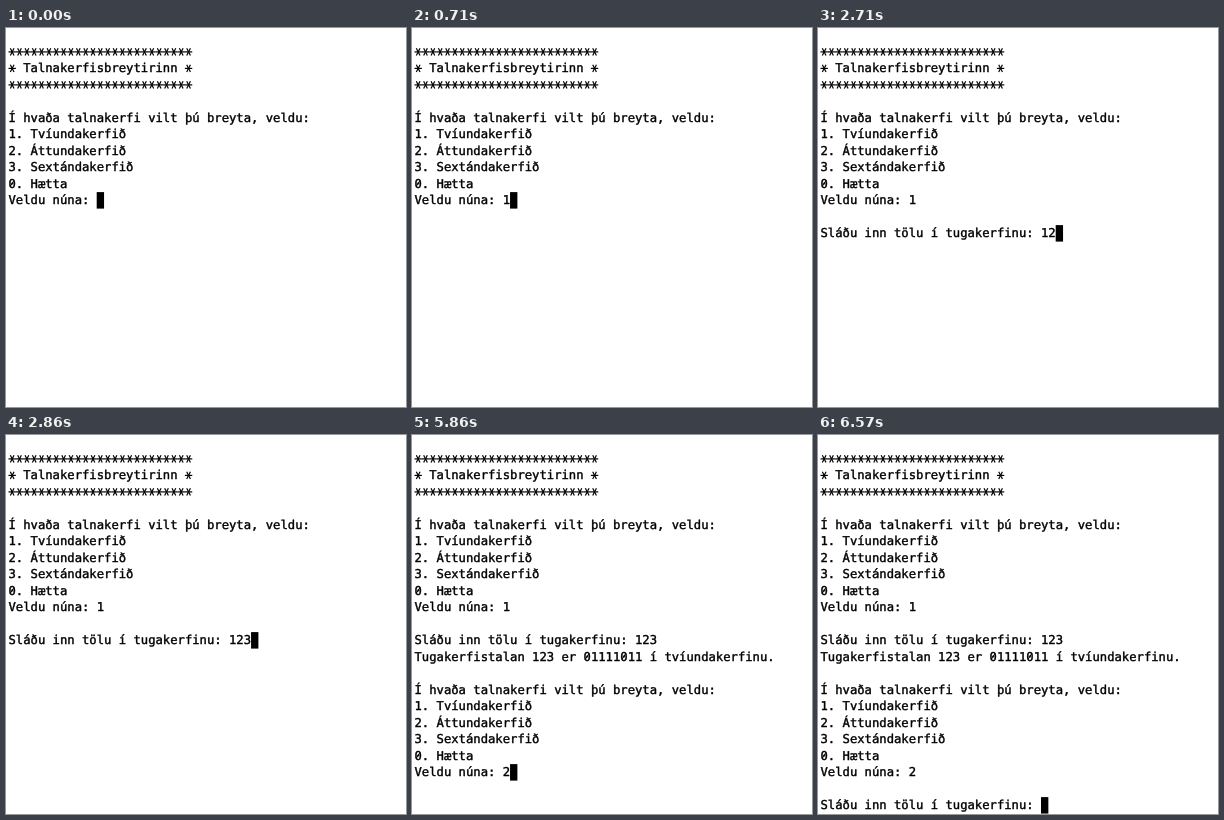
An HTML page with a canvas that plays this animation: 400 px wide and 379 px high, repeating every 8000 ms.

```html
<!DOCTYPE html>
<html lang="is">
<head>
<meta charset="utf-8">
<style>
html, body { margin: 0; width: 100%; height: 100%; overflow: hidden; background: #fff; }
canvas { display: block; }
</style>
</head>
<body>
<canvas width="400" height="379"></canvas>
<script>
const ctx = document.querySelector('canvas').getContext('2d');
const LOOP = 8000, CELL = 7.35, ROW = 16.5, LEFT = 2.5, TOP = 15.6, BASE = 12.1;

const stars = '*'.repeat(25);
const menu = `Í hvaða talnakerfi vilt þú breyta, veldu:
1. Tvíundakerfið
2. Áttundakerfið
3. Sextándakerfið
0. Hætta
Veldu núna: `;
const ask = '\n\nSláðu inn tölu í tugakerfinu: ';

// Terminal output: [time in ms, text appended]
const output = [
  [0, `${stars}\n* Talnakerfisbreytirinn *\n${stars}\n\n${menu}`],
  [710, '1'],
  [1570, ask],
  [2710, '12'],
  [2860, '3'],
  [3860, `\nTugakerfistalan 123 er 01111011 í tvíundakerfinu.\n\n${menu}`],
  [5860, '2'],
  [6570, ask]
];

function line(x, y, dx, dy, width) {
  ctx.lineWidth = width;
  ctx.beginPath();
  ctx.moveTo(x - dx, y - dy);
  ctx.lineTo(x + dx, y + dy);
  ctx.stroke();
}

// Wide six-armed asterisk, centred on the capitals
function asterisk(x, y) {
  for (const a of [0, Math.PI / 3, -Math.PI / 3])
    line(x, y, 3.7 * Math.cos(a), 4.2 * Math.sin(a), 1.2);
}

function glyph(ch, x, y) {
  const mid = x + CELL / 2;
  if (ch === '*') return asterisk(mid, y + 8.3);
  ctx.lineWidth = 0.4;
  ctx.fillText(ch, x, y + BASE);
  ctx.strokeText(ch, x, y + BASE);
  if (ch === '0') line(mid, y + BASE - 4.4, 1.8, -2.8, 1);
}

function draw(now) {
  const t = now % LOOP;
  const text = output.filter(([at]) => at <= t).map(([, s]) => s).join('');
  ctx.fillStyle = '#fff';
  ctx.fillRect(0, 0, 400, 379);
  ctx.fillStyle = ctx.strokeStyle = '#000';
  ctx.lineJoin = 'round';
  ctx.font = '12.21px "DejaVu Sans Mono", monospace';
  ctx.textRendering = 'geometricPrecision';
  let x = LEFT, y = TOP;
  for (const ch of text) {
    if (ch === '\n') {
      x = LEFT;
      y += ROW;
    } else {
      glyph(ch, x, y);
      x += CELL;
    }
  }
  ctx.fillRect(x, y, CELL, ROW);
  requestAnimationFrame(draw);
}
requestAnimationFrame(draw);
</script>
</body>
</html>
```
